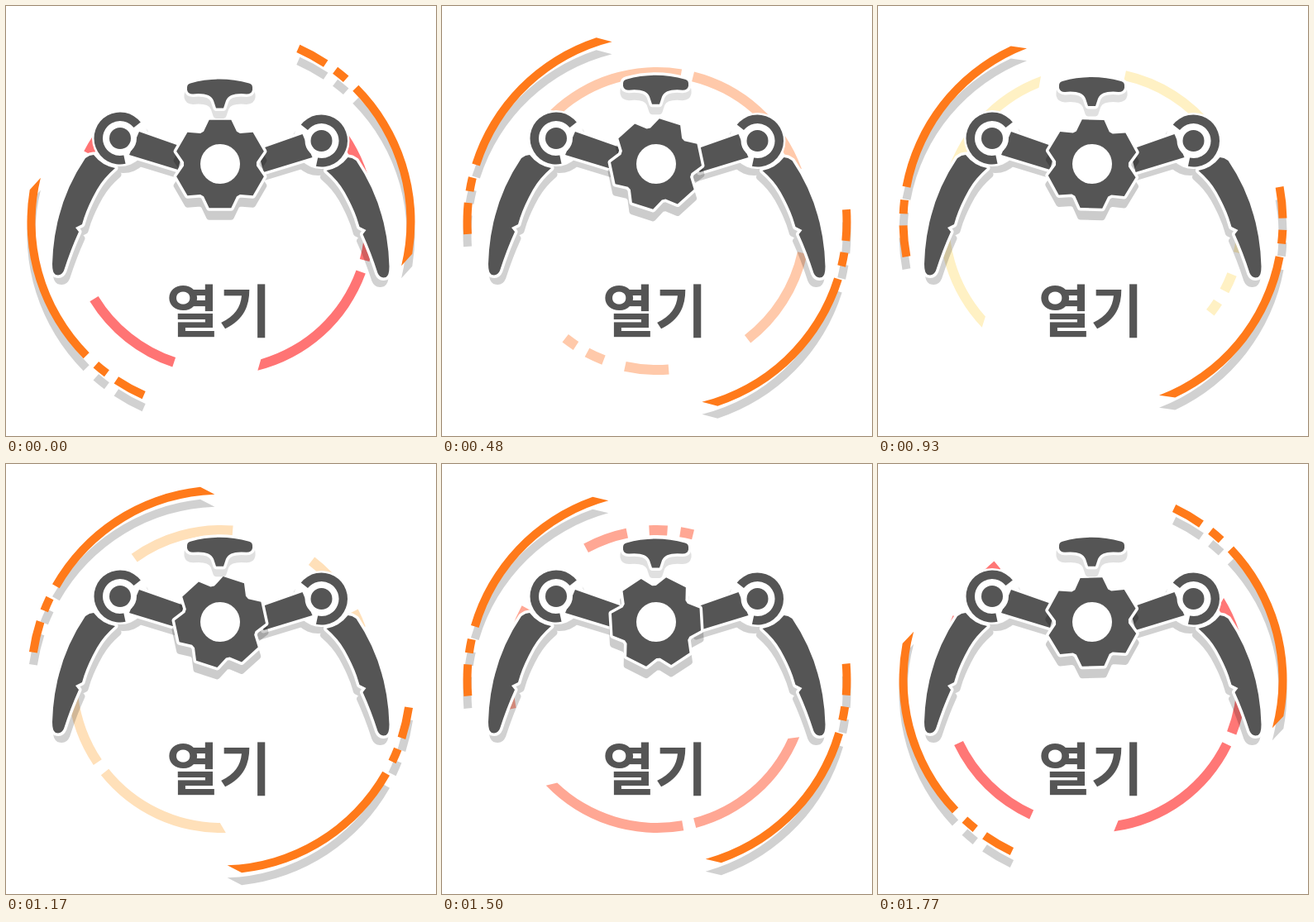
Animation of 520 by 520 pixels, one loop 1800 ms. Source, as an HTML page:

```html
<!DOCTYPE html>
<html lang="ko">
<head>
<meta charset="utf-8">
<title>열기</title>
<style>
  html, body { margin: 0; width: 100%; height: 100%; overflow: hidden; background: #fff; }
  svg { display: block; width: 100vw; height: 100vh; }
  .dark { fill: #555; }
  .edge { fill: #555; stroke: #fff; stroke-width: 7; stroke-linejoin: round; paint-order: stroke; }
  .arm { filter: drop-shadow(4px 8px 0 rgba(0, 0, 0, .18)); }
  .hub { filter: drop-shadow(0 11px 0 rgba(0, 0, 0, .2)); }
  .knob { filter: drop-shadow(0 9px 0 rgba(0, 0, 0, .12)); }
  .ring { filter: drop-shadow(0 15px 0 rgba(0, 0, 0, .18)); }
  text { font: 700 69px "Noto Sans CJK KR", "Noto Sans CJK", sans-serif; fill: #555; text-anchor: middle; }
</style>
</head>
<body>
<svg viewBox="0 0 520 520">
  <defs>
    <g id="arm" class="arm">
      <path class="edge" d="M101 181L106 180Q116 193 132 196Q118 208 110 222Q97 245 92 264L84 268L88 273Q78 295 70 320Q67 327 60 325Q56 323 56 312Q58 240 96 184Z"/>
      <circle cx="138" cy="160" r="34" fill="#fff"/>
      <path id="cuff" class="dark"/>
      <path class="edge" d="M161 152L215 171L208 198L149 180Z"/>
      <circle cx="138" cy="160" r="20" fill="#fff"/>
      <circle class="dark" cx="138" cy="160" r="13"/>
    </g>
  </defs>
  <path id="inner"/>
  <g class="ring"><path id="outer" fill="#ff7a1a"/></g>
  <use href="#arm"/>
  <use href="#arm" transform="translate(519.5 3) scale(-1 1)"/>
  <g class="hub">
    <path id="gear" class="edge"/>
    <circle cx="259" cy="191" r="24" fill="#fff"/>
  </g>
  <g class="knob">
    <path id="knob" class="edge" d="M219 99Q219 95 223 94Q258 84 294 94Q298 95 298 99V102Q297 107 291 107Q270 105 266 115L263 124H254L251 115Q247 105 226 107Q220 107 219 102Z"/>
  </g>
  <text x="257.3" y="394.5">열기</text>
</svg>
<script>
  const LOOP = 1800, STEP = 30;
  const $ = id => document.getElementById(id);
  const ease = x => x * x * (3 - 2 * x);
  const mix = (a, b, x) => a + (b - a) * x;

  const polar = (cx, cy, r, deg) => {
    const a = deg * Math.PI / 180;
    return (cx + r * Math.cos(a)).toFixed(2) + ' ' + (cy + r * Math.sin(a)).toFixed(2);
  };

  // Ring piece; the skews move its outer corners for slanted ends.
  function band(cx, cy, r0, r1, from, to, skewFrom = 0, skewTo = 0) {
    const big = to - from > 180 ? 1 : 0;
    return `M${polar(cx, cy, r1, from + skewFrom)}` +
      `A${r1} ${r1} 0 ${big} 1 ${polar(cx, cy, r1, to + skewTo)}` +
      `L${polar(cx, cy, r0, to)}` +
      `A${r0} ${r0} 0 ${big} 0 ${polar(cx, cy, r0, from)}Z`;
  }

  function gearPath(teeth) {
    const pts = [];
    for (let i = 0; i < teeth; i++) {
      const a = i * 360 / teeth - 90;
      pts.push(polar(259, 191, 44, a - 27), polar(259, 191, 55, a - 14),
               polar(259, 191, 55, a + 14), polar(259, 191, 44, a + 27));
    }
    return 'M' + pts.join('L') + 'Z';
  }

  // start angle, end angle, optional skews
  const innerParts = [
    [-35.6, 15.3, -2.2, 0], [20, 73.9, 0, 2.3], [108.4, 148.5],
    [181.5, 198.4], [207, 214], [219, 224]
  ];
  const outerParts = [[0, 9.5], [13, 17.2], [21.2, 79.7, 0, -4.2]];

  $('inner').setAttribute('d', innerParts.map(p => band(260, 260, 174, 186, ...p)).join(''));
  $('outer').setAttribute('d', [0, 180].flatMap(turn => outerParts.map(
    ([a, b, ...skew]) => band(260, 261, 224.5, 234.5, a + turn, b + turn, ...skew))).join(''));
  $('cuff').setAttribute('d', band(138, 160, 21, 31.5, 78, 322));
  $('gear').setAttribute('d', gearPath(6));

  // time, angle, optional lag of the easing
  const swing = [[0, -66], [600, 3.5], [900, -11], [1290, 14], [LOOP, -66, 1.3]];

  function swingAt(t) {
    const i = swing.findIndex(k => k[0] > t);
    const [t0, from] = swing[i - 1], [t1, to, lag = 1] = swing[i];
    return mix(from, to, ease(((t - t0) / (t1 - t0)) ** lag));
  }

  // Red to pale yellow and back
  function tintAt(t) {
    const x = Math.sin(Math.PI * t / LOOP) ** 1.3;
    return `rgb(255,${Math.round(mix(116, 241, x))},${Math.round(mix(116, 196, x))})`;
  }

  const rotate = (id, deg, cx, cy) => $(id).setAttribute('transform', `rotate(${deg} ${cx} ${cy})`);

  function draw(t) {
    const half = LOOP / 2;
    const lift = 2 + 3.5 * Math.cos(2 * Math.PI * (t - 570) / LOOP);
    rotate('inner', -t * 360 / LOOP, 260, 260);
    rotate('outer', swingAt(t), 260, 261);
    rotate('gear', 360 * ease(t % half / half), 259, 191);
    $('knob').setAttribute('transform', `translate(0 ${-lift})`);
    $('inner').setAttribute('fill', tintAt(t));
  }

  const start = performance.now();
  function tick() {
    const t = (performance.now() - start) % LOOP;
    draw(Math.floor(t / STEP) * STEP);
    requestAnimationFrame(tick);
  }
  tick();
</script>
</body>
</html>
```
